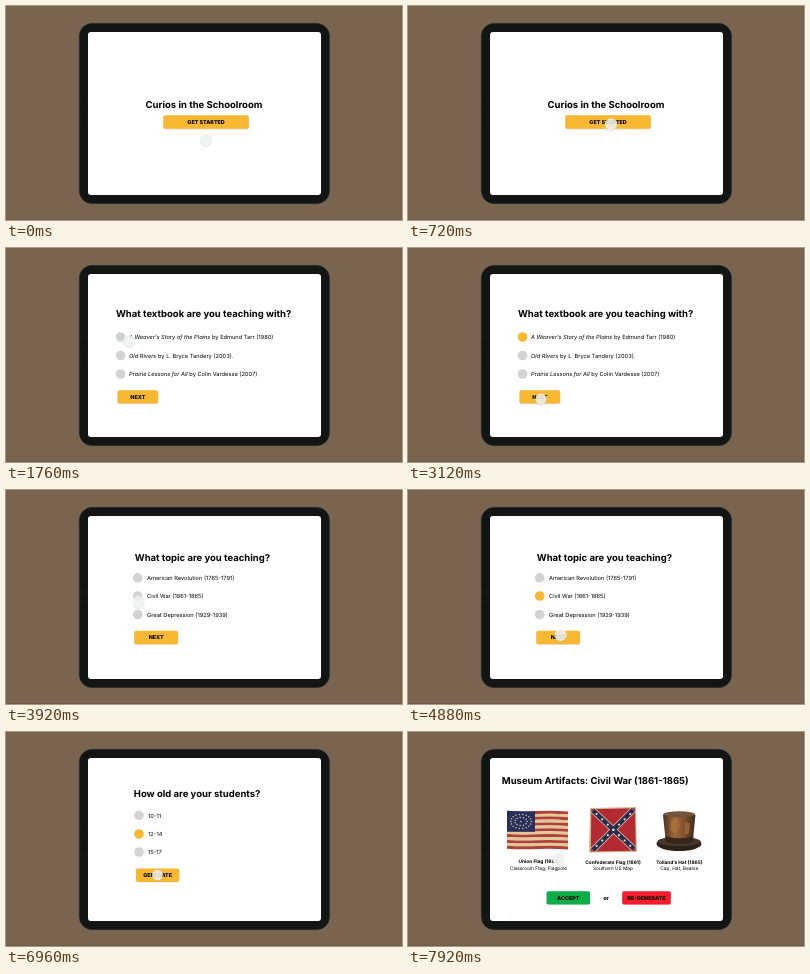
Recreate the animation shown at these times as an HTML page. Size 396 by 214 pixels, loop 8 s.

```html
<!DOCTYPE html>
<html lang="en">
<head>
<meta charset="utf-8">
<title>Classroom app demo</title>
<style>
  html, body { margin: 0; width: 100%; height: 100%; overflow: hidden; background: #79654f; }
  svg { display: block; width: 100%; height: 100%; }
  text { font-family: Inter, Roboto, sans-serif; fill: #000; text-rendering: geometricPrecision; }
  .title { font-size: 9.5px; font-weight: 700; }
  .body { font-size: 5.7px; }
  .label { font-size: 5.4px; font-weight: 800; }
  .cap { font-size: 4.8px; }
  .bold { font-weight: 700; }
  .mid { text-anchor: middle; }
</style>
</head>
<body>
<svg id="stage" viewBox="0 0 396 214"></svg>
<script>
const LOOP = 8000;
const YELLOW = '#f8b831', GREY = '#d3d3d3';
const svg = document.getElementById('stage');

const text = (x, y, cls, str) => `<text x="${x}" y="${y}" class="${cls}">${str}</text>`;
const rect = (x, y, w, h, r, fill, more = '') =>
  `<rect x="${x}" y="${y}" width="${w}" height="${h}" rx="${r}" fill="${fill}" ${more}/>`;
const button = (x, y, w, h, str, fill = YELLOW) =>
  rect(x - .3, y + .2, w + .6, h + .5, 2, '#8a8a8a', 'opacity=".25"') +
  rect(x, y, w, h, 1.8, fill) +
  text(x + w / 2, y + h / 2 + 1.9, 'label mid', str);
const option = (cx, cy, tx, str, id = '') =>
  `<circle cx="${cx}" cy="${cy}" r="4.8" fill="${GREY}" id="${id}"/>` + text(tx, cy + 2.1, 'body', str);
const screen = (id, ...parts) => `<g id="${id}">${parts.join('')}</g>`;
const book = (name, rest) => `<tspan font-style="italic">${name}</tspan> by ${rest}`;
const caption = (x, y, name, tags) =>
  text(x, y, 'cap bold mid', name) + text(x, 138.2, 'cap mid', tags);

function unionFlag() {
  let out = '';
  for (let i = 0; i < 13; i++) {
    const y = 80.2 + i * 2.92;
    out += `<path d="M99 ${y}q15 1 30.5 .3t30.5 .4" fill="none" stroke-width="3" stroke="${i % 2 ? '#e2c894' : '#b0403a'}"/>`;
  }
  out += '<path d="M99 78.7q14 1 28 .6v20.5h-28z" fill="#2a2f5c"/>';
  const ring = (n, rx, ry) => {
    for (let i = 0; i < n; i++) {
      const a = i / n * Math.PI * 2;
      out += `<circle cx="${113 + rx * Math.cos(a)}" cy="${89.5 + ry * Math.sin(a)}" r=".75" fill="#c9cfa4"/>`;
    }
  };
  ring(18, 10.2, 7.2);
  ring(11, 6, 4);
  ring(1, 0, 0);
  return out;
}

function battleFlag() {
  let out = '<path d="M182 76l46-1 1 45-48 .6z" fill="#d3b78c"/><path d="M183.3 77.2l43.6-1 .9 42.6-45 .6z" fill="#b32a33"/>';
  for (const [w, c] of [[6.2, '#e0cca8'], [4.6, '#2a2d50']])
    out += `<path d="M185 78.5L226 117M225 78L185 118" stroke="${c}" stroke-width="${w}"/>`;
  for (let i = -3; i <= 3; i++)
    for (const s of [-1, 1])
      out += `<circle cx="${205.4 + i * 5.6}" cy="${97.9 + s * i * 5.3}" r="1.1" fill="#ece2cc"/>`;
  return out;
}

const hat = () => `
  <ellipse cx="271" cy="111.8" rx="22.5" ry="7.2" fill="#2c211b"/>
  <ellipse cx="271" cy="109.6" rx="21.5" ry="4.6" fill="#49362b"/>
  <path d="M255 83q16-5.5 32.4 0l-2.6 27q-13.5 5-27 0z" fill="url(#felt)"/>
  <path d="M263 88l7-2 2 9-4 7-6-4zM277 90l5 1-1 10-4 2z" fill="#b9763c" opacity=".55"/>
  <path d="M257.3 104q13.7 4.6 28 0l-.5 6q-13.4 5-27 0z" fill="#38261c"/>
  <ellipse cx="271.2" cy="82.2" rx="16" ry="2.9" fill="#74543c"/>`;

svg.innerHTML = `
  <defs><linearGradient id="felt">
    <stop offset="0" stop-color="#49301f"/><stop offset=".35" stop-color="#9c683c"/>
    <stop offset=".65" stop-color="#7d5131"/><stop offset="1" stop-color="#3d2a1d"/>
  </linearGradient></defs>` +
  rect(0, 0, 396, 214, 0, '#79654f') +
  rect(0, 213, 396, 1, 0, '#6e5b4b') +
  rect(73.2, 17.3, 250.4, 180.4, 13, '#131515', 'stroke="#30383a" stroke-width=".5"') +
  [94, 107, 116].map(y => rect(76.5, y, 1.2, 3, .6, '#050606')).join('') +
  rect(82, 26, 233, 163, 3, '#fff') +
  screen('intro',
    text(198, 102.2, 'title mid', 'Curios in the Schoolroom'),
    button(157.3, 109.3, 85.5, 13.4, 'GET STARTED')) +
  screen('books',
    text(110, 69.3, 'title', 'What textbook are you teaching with?'),
    option(114.6, 89, 123, book('A Weaver’s Story of the Plains', 'Edmund Tarr (1980)'), 'pickBook'),
    option(114.6, 107.5, 123, book('Old Rivers', 'L. Bryce Tandery (2003).')),
    option(114.6, 126, 123, book('Prairie Lessons for All', 'Colin Vardesse (2007)')),
    button(111.6, 142.2, 40.5, 13.4, 'NEXT')) +
  screen('topics',
    text(128.8, 70.6, 'title', 'What topic are you teaching?'),
    option(131.7, 87.8, 141, 'American Revolution (1765-1791)'),
    option(131.7, 106, 141, 'Civil War (1861-1865)', 'pickTopic'),
    option(131.7, 124.5, 141, 'Great Depression (1929-1939)'),
    button(128.3, 140.8, 43.7, 13.4, 'NEXT')) +
  screen('ages',
    text(127.8, 65.3, 'title', 'How old are your students?'),
    option(133, 83.4, 142, '10-11'),
    option(133, 102, 142, '12-14', 'pickAge'),
    option(133, 120, 142, '15-17'),
    button(130, 136.5, 43.2, 13.4, 'GENERATE')) +
  screen('results',
    text(93.8, 51.6, 'title', 'Museum Artifacts: Civil War (1861-1865)'),
    unionFlag(), battleFlag(), hat(),
    caption(130.5, 131.2, 'Union Flag (1861)', 'Classroom Flag, Flagpole'),
    caption(205, 132.2, 'Confederate Flag (1861)', 'Southern US Map'),
    caption(271.3, 132.2, 'Tolland’s Hat (1865)', 'Cap, Hat, Beanie'),
    button(138.6, 159.2, 43.4, 13.4, 'ACCEPT', '#0dad47'),
    text(198, 168, 'label mid', 'or'),
    button(214.2, 159.2, 48.6, 13.4, 'RE-GENERATE', '#f71b2c')) +
  `<g id="cursor"><circle cy=".8" r="6.2" fill="#aab5b2" opacity=".3"/><circle r="6" fill="#f2f5f4" opacity=".82"/></g>`;

const el = id => document.getElementById(id);
const clamp = v => Math.max(0, Math.min(1, v));
const ramp = (t, a, b) => clamp((t - a) / (b - a));
const ease = p => p < .5 ? 4 * p ** 3 : 1 - 4 * (1 - p) ** 3;

// Cursor moves: start, end, target x, target y
const moves = [
  [20, 420, 203, 118.2],
  [1300, 1940, 115.5, 90.5],
  [2240, 2960, 133, 151],
  [3540, 4100, 132.5, 106],
  [4300, 4820, 152.5, 145],
  [5080, 5780, 134.3, 102.7],
  [6120, 6880, 151.5, 143],
  [7120, 7370, 150.3, 126.7]
];
const clicks = [620, 2130, 3160, 4190, 5910, 6970];

// Visibility: fade in start and end, fade out start and end
const fades = {
  intro: [-2, -1, 850, 1015],
  books: [820, 995, 3200, 3400],
  topics: [3200, 3400, 4919, 4920],
  ages: [4919, 4920, 7019, 7020],
  results: [7480, 7780, 9000, 9001]
};
const picks = { pickBook: 2150, pickTopic: 4200, pickAge: 5920 };

function draw(t) {
  for (const id in fades) {
    const [a, b, c, d] = fades[id];
    const o = ramp(t, a, b) * (1 - ramp(t, c, d));
    el(id).setAttribute('opacity', o);
    el(id).setAttribute('visibility', o ? 'visible' : 'hidden');
  }
  for (const id in picks) el(id).setAttribute('fill', t >= picks[id] ? YELLOW : GREY);

  let x = 200, y = 134;
  for (const [a, b, tx, ty] of moves) {
    const p = ease(ramp(t, a, b));
    x += (tx - x) * p;
    y += (ty - y) * p;
  }
  const press = Math.max(...clicks.map(c => 1 - Math.abs(t - c) / 100), 0);
  el('cursor').setAttribute('transform', `translate(${x} ${y}) scale(${1 - .14 * press})`);
}

const start = performance.now();
function tick() {
  draw((performance.now() - start) % LOOP);
  requestAnimationFrame(tick);
}
tick();
</script>
</body>
</html>
```
